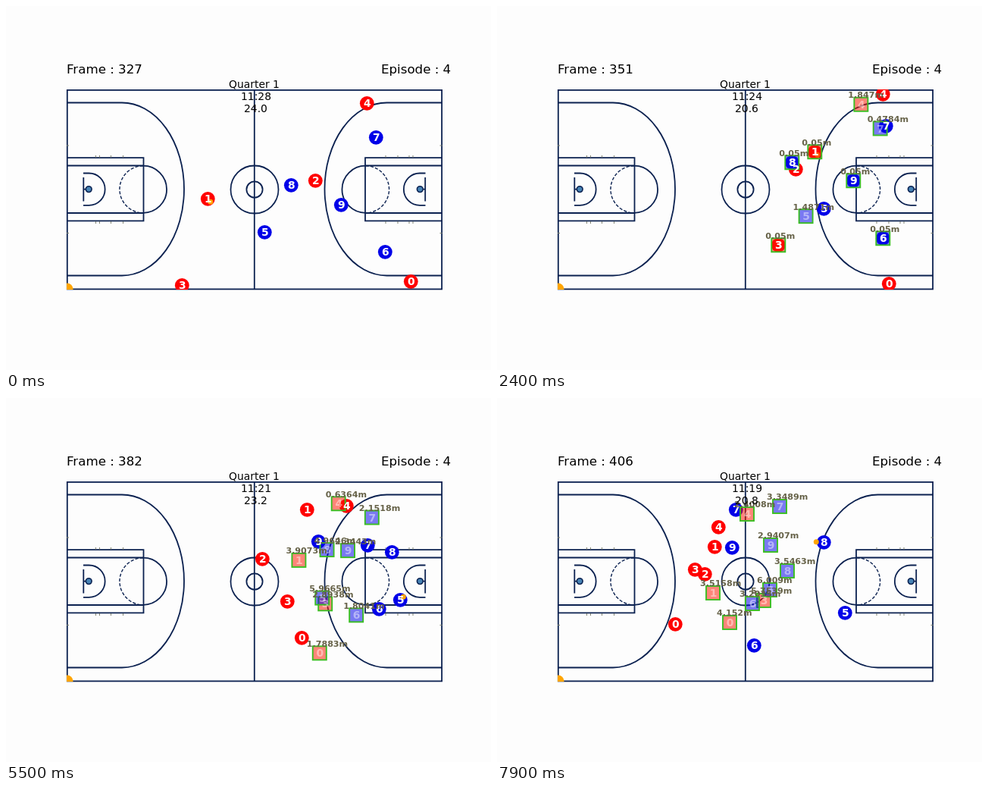
Animation of 640x480 px, one loop 8 s. Source, as an HTML page:

```html
<!DOCTYPE html>
<html lang="en">
<head>
<meta charset="utf-8">
<title>Court tracking</title>
<style>
html, body { margin: 0; width: 100%; height: 100%; overflow: hidden; background: #fdfdfd; }
svg { display: block; width: 640px; height: 480px; font-family: "DejaVu Sans", sans-serif; }
.lines { fill: none; stroke: #0b2150; stroke-width: 1.8; }
.tick { stroke: #7d8070; stroke-width: 1; }
.dash { stroke-width: 1.4; stroke-dasharray: 4.2 2.2; }
.hoop { fill: #4682b4; stroke-width: 1.6; }
.head { font-size: 16.67px; }
.info { font-size: 13.89px; text-anchor: middle; }
.num { font: bold 13.89px "DejaVu Sans", sans-serif; fill: #fff; text-anchor: middle; }
.ghost { opacity: .45; }
.err { font: bold 11.1px "DejaVu Sans", sans-serif; fill: #666248; }
.box { fill-opacity: .52; stroke: #3abe22; stroke-width: 1.9; }
.red { fill: #f00; }
.blue { fill: #0000e8; }
.box.red { fill: #ff1800; }
.ball { fill: orange; }
</style>
</head>
<body>
<svg viewBox="0 0 640 480">
  <defs>
    <clipPath id="court"><rect x="80" y="110" width="496" height="264"/></clipPath>
    <g id="half">
      <path d="M80.5 127.5H153A82 114 0 0 1 153 355.5H80.5"/>
      <path d="M80.5 200.2H181.5V283.3H80.5M80.5 210.5H181.5M80.5 273H181.5"/>
      <path d="M181 210.7A31 31 0 0 1 181 272.8"/>
      <path class="dash" d="M181 210.7A31 31 0 0 0 181 272.8"/>
      <path d="M102 220.5H109.5A21 21 0 0 1 109.5 262.8H102M102.3 226V257.5M102.3 241.6H105"/>
      <circle class="hoop" cx="109.2" cy="241.6" r="3.9"/>
      <path class="tick" d="M118.5 197v3m5-3v3m15-3v3m16-3v3M118.5 284v3m5-3v3m15-3v3m16-3v3M80 184h3M80 299.5h3"/>
    </g>
  </defs>
  <g class="lines">
    <rect x="80.8" y="110.9" width="494.3" height="262.5"/>
    <path d="M327.8 111V373.5"/>
    <circle cx="328" cy="242" r="31.5"/>
    <circle cx="328" cy="242" r="10.6"/>
    <use href="#half"/>
    <use href="#half" transform="translate(655.5 0) scale(-1 1)"/>
  </g>
  <g clip-path="url(#court)">
    <g id="dots"></g>
    <circle class="ball" cx="80.5" cy="373.5" r="8"/>
    <circle class="ball" id="ball"/>
    <g id="boxes"></g>
  </g>
  <g id="nums"></g>
  <g id="labels" clip-path="url(#court)"></g>
  <text class="head" id="frame" x="80" y="88.5"></text>
  <text class="head" x="495" y="88.5">Episode : 4</text>
  <text class="info" x="327.5" y="108">Quarter 1</text>
  <text class="info" id="clock" x="330" y="124"></text>
  <text class="info" id="shot" x="329.5" y="140"></text>
</svg>
<script>
const STEP = 100, COUNT = 80, FIRST = 327;
const KEYS = [0, 10, 24, 43, 55, 69, 79];
const MID = 43, END = 79;
const METRES = 28.65 / 495, MIN_ERR = .05;
const $ = id => document.getElementById(id);
const mix = (a, b, u) => a.map((v, i) => v + (b[i] - v) * u);
const distance = (a, b) => Math.hypot(a[0] - b[0], a[1] - b[1]);

function add(parent, tag, cls, attrs = {}, text = '') {
  const el = document.createElementNS('http://www.w3.org/2000/svg', tag);
  el.setAttribute('class', cls);
  for (const k in attrs) el.setAttribute(k, attrs[k]);
  el.textContent = text;
  return $(parent).appendChild(el);
}
function place(el, [x, y]) { el.setAttribute('transform', `translate(${x.toFixed(2)} ${y.toFixed(2)})`); }

// cubic Hermite through the points at KEYS
function along(points, n) {
  let i = 0;
  while (i < KEYS.length - 2 && n >= KEYS[i + 1]) i++;
  const span = KEYS[i + 1] - KEYS[i], u = (n - KEYS[i]) / span, v = 1 - u;
  const slope = (j, axis) => {
    const a = Math.max(j - 1, 0), b = Math.min(j + 1, KEYS.length - 1);
    return (points[b][axis] - points[a][axis]) / (KEYS[b] - KEYS[a]) * span;
  };
  return [0, 1].map(k =>
    points[i][k] * (1 + 2 * u) * v * v + slope(i, k) * u * v * v +
    points[i + 1][k] * u * u * (3 - 2 * u) - slope(i + 1, k) * u * u * v);
}

// path: real places at KEYS; guess: when sight is lost, estimates at MID and END, drift easing
const roster = [
  { path: '534,363 533,368 517,366 463,354 390,316 293,294 235,298',
    guess: { lost: 39, mid: [463, 355], end: [307, 296], ease: 1.05 } },
  { path: '266,254 328,239 419,192 445,166 397,147 327,178 287,196',
    guess: { lost: 24, mid: [431, 195], end: [285, 257], ease: 1.08 } },
  { path: '408,230 399,226 394,215 375,213 338,212 297,222 274,232' },
  { path: '232,368 291,349 371,315 414,277 371,268 304,248 261,226',
    guess: { lost: 24, mid: [431, 272], end: [352, 267], ease: 1.9 } },
  { path: '476,128 492,121 509,116 495,125 449,142 366,177 292,170',
    guess: { lost: 10, mid: [473, 135], end: [330, 153], ease: 1.3 } },
  { path: '341,298 371,295 431,267 492,253 520,266 507,289 459,283',
    guess: { lost: 10, mid: [430, 266], end: [360, 253], ease: 1.55 } },
  { path: '500,324 503,318 509,306 511,276 492,278 415,299 339,326',
    guess: { lost: 24, mid: [500, 291], end: [337, 271], ease: 1.33 } },
  { path: '488,173 500,162 513,158 505,174 477,194 389,167 315,147',
    guess: { lost: 10, mid: [509, 161], end: [373, 143], ease: 1.5 } },
  { path: '376,236 385,231 389,206 465,216 509,203 484,182 431,190',
    guess: { lost: 24, mid: [431, 195], end: [383, 228], ease: 1.7 } },
  { path: '442,262 454,245 470,230 444,191 412,189 359,194 310,197',
    guess: { lost: 24, mid: [474, 203], end: [361, 194], ease: 1.45 } }
];

const players = roster.map(({ path, guess }, id) => {
  const points = path.split(' ').map(p => p.split(',').map(v => +v + .3));
  const team = id < 5 ? 'red' : 'blue';
  const number = cls => add('nums', 'text', cls, { x: .5, y: 5 }, id);
  return {
    guess,
    at: n => along(points, n),
    ghost: guess && [
      add('boxes', 'rect', 'box ' + team, { x: -9, y: -9, width: 18, height: 18 }),
      number('num ghost'),
      add('labels', 'text', 'err', { x: -17, y: -8.6 })
    ],
    solid: [add('dots', 'circle', team, { r: 9.4 }), number('num')]
  };
});

// the estimate leaves the last seen place quickly, then drifts back up the court
function estimate({ at, guess }, n) {
  const { lost, mid, end, ease } = guess;
  if (n < MID) return mix(at(lost), mid, Math.sin((n - lost) / (MID - lost) * Math.PI / 2));
  return mix(mid, end, ((n - MID) / (END - MID)) ** ease);
}

function drawPlayer(p, n) {
  const real = p.at(n);
  p.solid.forEach(el => place(el, real));
  if (!p.guess) return;
  const lost = n >= p.guess.lost;
  p.ghost.forEach(el => el.style.display = lost ? '' : 'none');
  if (!lost) return;
  const spot = estimate(p, n);
  p.ghost.forEach(el => place(el, spot));
  const err = Math.max(MIN_ERR, distance(real, spot) * METRES);
  p.ghost[2].textContent = +err.toFixed(4) + 'm';
}

// who has the ball and when; it flies between holds and looks larger when high
const held = (id, dx, dy) => n => mix(players[id].at(n), [dx, dy], 0).map((v, i) => v + [dx, dy][i]);
const holds = [
  { from: 0, to: 28, at: held(1, 3.5, 4) },
  { from: 31, to: 36, at: held(2, 3.5, 4) },
  { from: 45, to: 46, at: () => [546, 241.6] },
  { from: 50, to: 65, at: held(5, 4, -4) },
  { from: 73, to: 80, at: held(8, -10, -.5) }
];
function drawBall(n) {
  const i = holds.findIndex(h => n < h.to), next = holds[i];
  let spot = next.at(n), r = 3.5;
  if (n < next.from) {
    const prev = holds[i - 1], u = (n - prev.to) / (next.from - prev.to);
    const a = prev.at(prev.to), b = next.at(next.from);
    spot = mix(a, b, u);
    r += distance(a, b) * .05 * Math.sin(u * Math.PI);
  }
  place($('ball'), spot);
  $('ball').setAttribute('r', r);
}

function draw(n) {
  players.forEach(p => drawPlayer(p, n));
  drawBall(n);
  $('frame').textContent = 'Frame : ' + (FIRST + n);
  // game time pauses briefly after the basket; the shot clock restarts
  const scored = n >= 47;
  const shot = scored ? 24 - (n - 47) / 10 : 24 - .15 * Math.min(n, 10) - .1364 * Math.max(n - 10, 0);
  $('shot').textContent = shot.toFixed(1);
  $('clock').textContent = '11:' + Math.floor(scored ? shot - 1.75 : shot + 4.04);
}

const start = performance.now();
let last = -1;
function tick() {
  const n = Math.floor((performance.now() - start) / STEP) % COUNT;
  if (n !== last) draw(last = n);
  requestAnimationFrame(tick);
}
tick();
</script>
</body>
</html>
```
